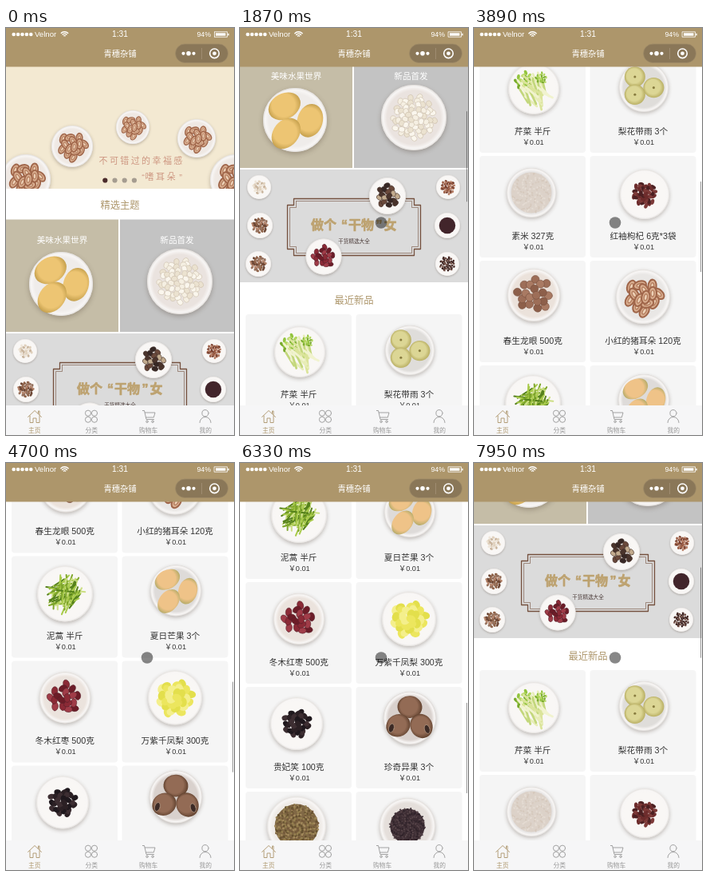
Recreate the animation shown at these times as an HTML page with a canvas. Size 286 by 509 pixels, loop 8 s.

```html
<!DOCTYPE html>
<html lang="zh">
<head>
<meta charset="utf-8">
<style>
html, body { margin: 0; width: 100%; height: 100%; overflow: hidden; background: #fff; }
canvas { display: block; width: 286px; height: 509px; }
</style>
</head>
<body>
<canvas id="stage"></canvas>
<script>
const W = 286, H = 509, LOOP = 8000, TAU = Math.PI * 2;
const VIEW_TOP = 48.5, VIEW_END = 472, BAR_RATIO = 0.267;
const GOLD = '#ad966b';
const canvas = document.getElementById('stage');
const dpr = window.devicePixelRatio || 1;
canvas.width = W * dpr;
canvas.height = H * dpr;
const c = canvas.getContext('2d');

// Each wheel gesture: start time and the offsets held for one screen refresh each.
const REFRESH = 204;
const gestures = [
  [0, [0]],
  [1250, [22.5, 76, 140, 205, 265, 305]],
  [3270, [318, 381, 457, 534, 680, 816]],
  [4700, [839.5, 902, 975, 1045, 1112, 1164]],
  [6100, [1085, 938, 785, 645, 515, 412, 340, 305]],
  [7950, [304]]
];

function scrollAt(t) {
  const [start, stops] = gestures.filter(g => t >= g[0]).pop();
  const i = Math.floor((t - start + 8) / REFRESH);
  return stops[Math.min(i, stops.length - 1)];
}

function barAlpha(t) {
  if (t < 1250 || (t >= 2890 && t < 3270)) return 0;
  return t >= 2660 && t < 2890 ? 0.5 : 1;
}

// ---- drawing helpers ----
function rng(seed) {
  return () => (seed = (seed * 16807) % 2147483647) / 2147483647;
}

function text(s, x, y, size, color, align = 'center', weight = 400) {
  c.font = `${weight} ${size}px "Liberation Sans", "Noto Sans CJK SC", "Noto Sans CJK", sans-serif`;
  c.textAlign = align;
  c.fillStyle = color;
  c.fillText(s, x, y + size * 0.37);
}

function spaced(s, x, y, pitch, size, color) {
  [...s].forEach((ch, i) => text(ch, x + i * pitch, y, size, color, 'center', 300));
}

function rect(x, y, w, h, color) {
  c.fillStyle = color;
  c.fillRect(x, y, w, h);
}

function round(x, y, w, h, r, color) {
  c.beginPath();
  c.roundRect(x, y, w, h, r);
  c.fillStyle = color;
  c.fill();
}

function oval(x, y, rx, ry, rot, fill, edge, lw = 0.6) {
  c.beginPath();
  c.ellipse(x, y, rx, ry, rot, 0, TAU);
  if (fill) { c.fillStyle = fill; c.fill(); }
  if (edge) { c.strokeStyle = edge; c.lineWidth = lw; c.stroke(); }
}

const disc = (x, y, r, fill, edge, lw) => oval(x, y, r, r, 0, fill, edge, lw);

function lines(color, lw, ...paths) {
  c.strokeStyle = color;
  c.lineWidth = lw;
  c.lineJoin = c.lineCap = 'round';
  for (const p of paths) {
    c.beginPath();
    for (let i = 0; i < p.length; i += 2) c.lineTo(p[i], p[i + 1]);
    c.stroke();
  }
}

function plate(x, y, r, tint = '#f9f7f5') {
  c.save();
  c.shadowColor = 'rgba(70,55,45,.32)';
  c.shadowBlur = r * 0.16 * dpr;
  c.shadowOffsetY = r * 0.06 * dpr;
  disc(x, y, r, tint);
  c.restore();
  const g = c.createRadialGradient(x, y, r * 0.6, x, y, r);
  g.addColorStop(0, tint);
  g.addColorStop(0.55, tint);
  g.addColorStop(0.85, '#f8f6f5');
  g.addColorStop(1, '#e2dfdc');
  disc(x, y, r, g);
}

// ---- foods; x, y, r describe the plate ----
function scatter(x, y, R, n, put) {
  const rnd = rng(n * 977 + 31);
  for (let i = n - 1; i >= 0; i--) {
    const a = i * 2.4 + rnd() * 0.3, d = Math.sqrt((i + 0.4) / n) * R;
    put(x + Math.cos(a) * d, y + Math.sin(a) * d, rnd, i);
  }
}

const bits = (spread, n, w, h, colors, edge) => (x, y, r) =>
  scatter(x, y, r * spread, n, (px, py, rnd, i) =>
    oval(px, py, r * w, r * h, rnd() * 3, colors[i % colors.length], edge));

// A solid heap with loose grains on top.
const heap = (size, base, grain) => (x, y, r) => {
  disc(x, y, r * size, base);
  grain(x, y, r);
};

const ears = (x, y, r) => scatter(x, y, r * 0.6, 14, (px, py, rnd) => {
  const a = rnd() * 3;
  oval(px, py, r * 0.24, r * 0.15, a, '#d9ae90', '#a0664a', r * 0.06);
  oval(px, py, r * 0.12, r * 0.06, a, '#ecd0b6', '#b37c5d', r * 0.04);
});

const sticks = (n, spread, len, tilt, wobble, colors, lw) => (x, y, r) =>
  scatter(x, y, r * spread, n, (px, py, rnd, i) => {
    const a = tilt + (rnd() - 0.5) * wobble, dx = Math.cos(a) * r * len, dy = Math.sin(a) * r * len;
    lines(colors[i % colors.length], lw, [px - dx, py - dy, px + dx, py + dy]);
  });

const stalks = sticks(26, 0.5, 0.3, 0.95, 1.1, ['#dbe49a', '#f1f3cf', '#c3d77c', '#e8edb8'], 2.8);
const leaves = bits(0.36, 18, 0.1, 0.06, ['#93c43f', '#b3d75f', '#79ab2e']);
function celery(x, y, r) {
  leaves(x - r * 0.35, y - r * 0.3, r);
  stalks(x + r * 0.03, y + r * 0.08, r);
  leaves(x + r * 0.3, y - r * 0.42, r * 0.6);
}

const trio = (spots, w, h, light, dark) => (x, y, r) => {
  for (const [dx, dy, rot] of spots) {
    const px = x + dx * r, py = y + dy * r;
    const g = c.createRadialGradient(px - r * 0.1, py - r * 0.1, r * 0.05, px, py, r * w);
    g.addColorStop(0, light);
    g.addColorStop(0.65, light);
    g.addColorStop(1, dark);
    oval(px, py, r * w, r * h, rot, g);
  }
};
const mangoSpots = [[-0.33, -0.43, -0.5], [0.47, 0.02, 1.85], [-0.28, 0.42, -0.9]];
const mango = trio(mangoSpots, 0.53, 0.4, '#edc573', '#c49f4c');
const paleMango = trio(mangoSpots, 0.52, 0.37, '#efc388', '#b5ab68');
const pearSpots = [[-0.36, -0.42, 0], [0.4, 0.02, 0], [-0.36, 0.3, 0]];
const pearBody = trio(pearSpots, 0.42, 0.41, '#dcd695', '#b8ae62');
function pears(x, y, r) {
  pearBody(x, y, r);
  for (const [dx, dy] of pearSpots) disc(x + dx * r, y + dy * r, r * 0.05, '#877b3f');
}
const kiwiBody = trio([[0, -0.42, 0.1], [-0.44, 0.28, -0.5], [0.44, 0.3, 1.1]], 0.47, 0.42, '#936b55', '#61422f');
function kiwi(x, y, r) {
  kiwiBody(x, y, r);
  oval(x - r * 0.7, y + r * 0.38, r * 0.1, r * 0.17, 0.3, '#3c2a25', '#c7ae98');
  oval(x + r * 0.66, y + r * 0.42, r * 0.1, r * 0.17, -0.3, '#3c2a25', '#c7ae98');
}

const rice = heap(0.82, '#dcd2c9', bits(0.8, 190, 0.045, 0.03, ['#d5c8bc', '#e5dcd3', '#dcd1c7']));
const goji = bits(0.47, 34, 0.12, 0.075, ['#6d2c2c', '#4c2022', '#7d3a38']);
const longan = bits(0.66, 19, 0.155, 0.15, ['#9d6e58', '#a97a63', '#8d5f4a'], '#76503e');
const wormwood = sticks(58, 0.47, 0.31, -0.75, 1.9, ['#7ea62a', '#a9cb4c', '#55811b', '#cbde83'], 2);
const dates = bits(0.58, 18, 0.17, 0.12, ['#8b2a36', '#6c1c27', '#a03c48'], '#57202a');
const pineapple = bits(0.62, 28, 0.18, 0.14, ['#ece65e', '#f4ef8c', '#e3df4c']);
const lychee = bits(0.5, 27, 0.13, 0.1, ['#2b2024', '#3d2e32', '#1f181d']);
const mung = heap(0.74, '#806845', bits(0.74, 260, 0.04, 0.035, ['#95804f', '#64502f', '#a38a5c', '#74593a']));
const sesame = heap(0.62, '#3d2d33', bits(0.64, 220, 0.035, 0.025, ['#4b3a40', '#2f232a', '#5a484c']));
const mushrooms = bits(0.52, 9, 0.25, 0.22, ['#d9c29b', '#c7ad83'], '#a98d65');
const whiteBeans = bits(0.66, 58, 0.095, 0.08, ['#f5efe2', '#ebe2d0', '#faf6ed'], '#c9bda8');
const nuts = bits(0.55, 22, 0.13, 0.1, ['#e0d1bd', '#cab69f', '#efe6da']);
const mixed = bits(0.6, 40, 0.12, 0.09, ['#8e6147', '#6d4735', '#b3836a', '#94705c']);
const redNuts = bits(0.58, 34, 0.12, 0.09, ['#96573f', '#784030', '#b9826a']);
const darkNuts = bits(0.62, 44, 0.1, 0.08, ['#4a2e2a', '#6e4a40', '#39211f']);
const slices = bits(0.6, 17, 0.17, 0.13, ['#4a342c', '#c2ab8e', '#6a493b', '#372825'], '#3f2d27');
const paste = (x, y, r) => disc(x, y, r * 0.64, '#42252b');

const products = [
  ['芹菜 半斤', 75, 47, 32, celery], ['梨花带雨 3个', 213, 45, 31, pears, '#dfddda'],
  ['素米 327克', 72, 46, 31, rice, '#e2e0df'], ['红袖枸杞 6克*3袋', 214, 48, 31, goji],
  ['春生龙眼 500克', 75, 43, 33, longan, '#ebe2db'], ['小红的猪耳朵 120克', 212, 45, 34, ears, '#e9e7e5'],
  ['泥蒿 半斤', 74, 47, 35, wormwood], ['夏日芒果 3个', 213, 43, 32, paleMango, '#dedbd9'],
  ['冬木红枣 500克', 74, 46, 32, dates, '#ebe3dd'], ['万紫千凤梨 300克', 212, 46, 34, pineapple],
  ['贵妃笑 100克', 71, 46, 33, lychee], ['珍奇异果 3个', 213, 39, 33, kiwi, '#d9d1cd'],
  ['绿豆 125克', 71, 43, 37, mung, '#efebe7'], ['芝麻 50克', 210, 43, 35, sesame, '#e5dfdb'],
  ['猴头菇 370克', 73, 45, 33, mushrooms]
];

// ---- page sections, in unscrolled coordinates ----
function serve(x, y, r, food, tint) {
  plate(x, y, r, tint);
  food(x, y, r);
}

function hero() {
  rect(0, 48, W, 153, '#f3e9d2');
  c.save();
  c.beginPath();
  c.rect(0, 48, W, 153);
  c.clip();
  for (const [x, y, r] of [[83, 148, 26], [159, 124, 21], [239, 138, 24], [25, 189, 31], [288, 190, 32]])
    serve(x, y, r, ears, '#efe9e4');
  c.restore();
  spaced('不可错过的幸福感', 122, 166, 13.4, 11, '#cd9680');
  spaced('嗜耳朵', 180, 186, 13.6, 11, '#cd9680');
  text('“', 172, 187, 11, '#cd9680');
  text('”', 219, 187, 11, '#cd9680');
  for (let i = 0; i < 4; i++) disc(124.3 + i * 12.2, 190.5, 3.1, i ? '#a59c90' : '#4b2b2b');
}

function themes() {
  text('精选主题', 143, 221, 12.3, GOLD);
  rect(0, 239.5, 141, 140.5, '#c5bda7');
  rect(143, 239.5, 143, 140.5, '#c3c3c3');
  text('美味水果世界', 70.5, 265, 10.6, '#fff');
  text('新品首发', 214.5, 265, 10.6, '#fff');
  serve(69, 320, 40, mango, '#efecea');
  serve(218, 317, 41, whiteBeans, '#eae3df');
}

function notched(x, y, w, h, n, lw) {
  const r = x + w, b = y + h;
  lines('#75513f', lw, [x + n, y, r - n, y, r - n, y + n, r, y + n, r, b - n, r - n, b - n,
    r - n, b, x + n, b, x + n, b - n, x, b - n, x, y + n, x + n, y + n, x + n, y]);
}

function feature() {
  rect(0, 382, W, 141, '#dbdbdb');
  notched(59.5, 418.5, 167, 71, 8, 1.3);
  notched(62.5, 421.5, 161, 65, 8, 0.6);
  const side = [
    [24, 404, 15, nuts], [25, 452, 16, mixed], [23, 500, 16, mixed],
    [261, 404, 15, redNuts], [260, 452, 16, paste], [260, 500, 15, darkNuts],
    [185, 415, 23, slices], [105, 491, 22.5, dates]
  ];
  for (const s of side) serve(...s);
  const ink = '#bda270';
  c.strokeStyle = ink;
  c.lineWidth = 0.7;
  for (const [s, x] of [['做个', 105], ['“', 131], ['干物', 152], ['”', 174.5], ['女', 188.5]]) {
    text(s, x, 451, 16, ink, 'center', 900);
    c.strokeText(s, x, 451 + 16 * 0.37);
  }
  text('干货精选大全', 143, 471.5, 6.6, '#4b3b38');
}

function card([name, px, dy, r, food, tint], i) {
  const col = i % 2, top = 563 + Math.floor(i / 2) * 131, mid = col ? 212 : 73.7;
  round(col ? 145.5 : 7, top, 133, 127, 4, '#f5f5f5');
  serve(px, top + dy, r, food, tint);
  text(name, mid, top + 100, 10.7, '#333');
  text('￥0.01', mid + 0.5, top + 113.3, 9.2, '#333');
}

function page(scroll) {
  rect(0, 0, W, H, '#fff');
  c.save();
  c.translate(0, -scroll);
  if (scroll < 335) { hero(); themes(); }
  if (scroll < 520) { feature(); text('最近新品', 143, 545, 12.3, GOLD); }
  products.forEach((p, i) => {
    const y = 563 + Math.floor(i / 2) * 131 - scroll;
    if (y > -90 && y < VIEW_END) card(p, i);
  });
  c.restore();
}

function header() {
  rect(0, 0, W, VIEW_TOP, GOLD);
  for (let i = 0; i < 5; i++) disc(9.7 + i * 5.4, 8, 2.3, '#fff');
  text('Velnor', 36, 7.5, 9.6, '#fff', 'left');
  for (const r of [1.6, 4, 6.4]) {
    c.beginPath();
    c.arc(73.5, 11.2, r, -Math.PI * 0.76, -Math.PI * 0.24);
    c.strokeStyle = '#fff';
    c.lineWidth = 1.4;
    c.stroke();
  }
  text('1:31', 143, 7.3, 10.2, '#fff');
  text('94%', 257, 7.6, 8.8, '#fff', 'right');
  c.lineWidth = 0.8;
  c.strokeStyle = '#fff';
  c.strokeRect(261.5, 4.8, 16, 6.4);
  rect(263, 6.3, 12.5, 3.4, '#fff');
  rect(278.3, 6.8, 1.4, 2.6, '#fff');
  text('青穗杂铺', 143, 32, 10.3, '#fff', 'center', 500);
  round(212.5, 20, 66, 23.5, 12, '#8a7758');
  c.strokeStyle = '#a08c69';
  c.lineWidth = 0.7;
  c.stroke();
  disc(222.5, 31.8, 2.1, '#fff');
  disc(229, 31.8, 2.8, '#fff');
  disc(235.5, 31.8, 2.1, '#fff');
  rect(245.2, 25, 0.7, 14, '#a6967b');
  disc(261.5, 31.8, 5.8, null, '#fff', 1.6);
  disc(261.5, 31.8, 2.4, '#fff');
}

function tabs() {
  const ink = '#999', lw = 0.9;
  rect(0, VIEW_END, W, H - VIEW_END, '#f6f6f7');
  lines(GOLD, lw, [27.5, 486.5, 36, 478.5, 44.5, 486.5],
    [30, 485, 30, 493.5, 34, 493.5, 34, 488, 38, 488, 38, 493.5, 42, 493.5, 42, 485],
    [40.5, 482, 40.5, 479, 42, 479, 42, 483.5]);
  for (const dx of [-4, 4]) for (const dy of [-4, 4]) disc(107 + dx, 485.7 + dy, 3.6, null, ink, lw);
  lines(ink, lw, [171, 478.5, 173.5, 478.5, 176, 489.5, 185.5, 489.5], [174.2, 481, 187, 481, 185.3, 487, 175.5, 487]);
  disc(177, 492.2, 1.3, null, ink, lw);
  disc(184, 492.2, 1.3, null, ink, lw);
  disc(250, 481.7, 4.1, null, ink, lw);
  c.beginPath();
  c.arc(250, 493.5, 7, Math.PI, TAU);
  c.stroke();
  ['主页', '分类', '购物车', '我的'].forEach((s, i) =>
    text(s, 35.7 + i * 71.5, 503, 7.8, i ? '#999' : GOLD));
}

function pointer(t) {
  if (t < 200) return;
  const [x, y] = t < 420 ? [235, 356] : [177, 243.5];
  disc(x, y, 7.3, 'rgba(0,0,0,.47)');
}

function draw(t) {
  const scroll = scrollAt(t);
  c.setTransform(dpr, 0, 0, dpr, 0, 0);
  page(scroll);
  const alpha = barAlpha(t) * 0.4;
  if (alpha) rect(284, 49.5 + scroll * BAR_RATIO, 1, 113, `rgba(0,0,0,${alpha})`);
  header();
  tabs();
  pointer(t);
}

let shown = '';
const origin = performance.now();
function tick() {
  const t = (performance.now() - origin) % LOOP;
  const state = [scrollAt(t), barAlpha(t), t < 200, t < 420].join();
  if (state !== shown) {
    draw(t);
    shown = state;
  }
  requestAnimationFrame(tick);
}
tick();
</script>
</body>
</html>
```
